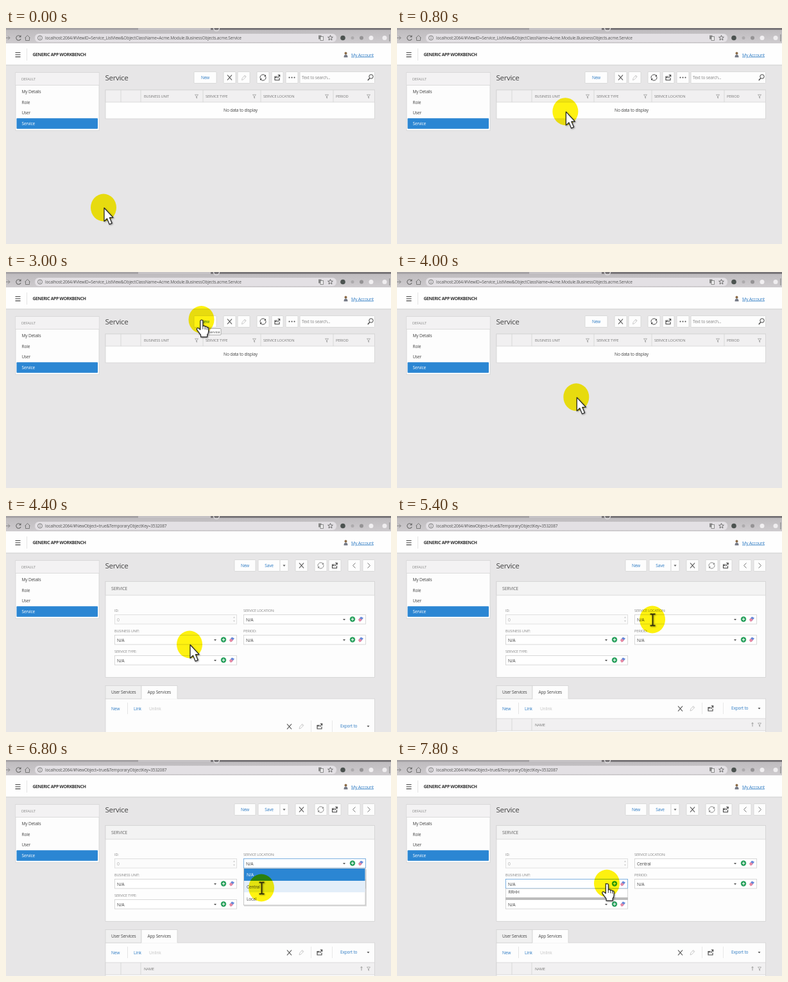
Write an HTML page that moves like this. It is 600x338 px and loops after 8 s.

```html
<!DOCTYPE html>
<html lang="en">
<head>
<meta charset="utf-8">
<title>Service form</title>
<style>
  html, body { margin: 0; width: 100%; height: 100%; overflow: hidden; background: #e7e6e7; }
  svg { display: block; width: 600px; height: 338px; }
  text { font-family: "Open Sans", "Noto Sans", sans-serif; letter-spacing: -.03em; }
  .brand { font-weight: 700; letter-spacing: -.05em; }
  #halo { mix-blend-mode: multiply; }
  #cursor { filter: drop-shadow(1.5px 1.5px 1px #0006); }
</style>
</head>
<body>
<svg id="stage" viewBox="0 0 600 338"></svg>
<script>
const BLUE = '#2b86d3', LINK = '#2f7cc4', INK = '#444', MUTED = '#858585', FAINT = '#c4c4c4', EDGE = '#d3d3d3';

// Drawing helpers, each returning SVG markup
const rect = (x, y, w, h, fill, stroke = 'none', extra = '') =>
  `<rect x="${x}" y="${y}" width="${w}" height="${h}" fill="${fill}" stroke="${stroke}" stroke-width=".8" ${extra}/>`;
const text = (x, y, s, size = 6.6, fill = INK, extra = '') =>
  `<text x="${x}" y="${y}" font-size="${size}" fill="${fill}" ${extra}>${s}</text>`;
const line = (d, color = INK, width = 1) =>
  `<path d="${d}" fill="none" stroke="${color}" stroke-width="${width}"/>`;
const shape = (d, fill) => `<path d="${d}" fill="${fill}"/>`;
const dot = (x, y, r, fill) => `<circle cx="${x}" cy="${y}" r="${r}" fill="${fill}"/>`;
const ring = (x, y, r, color, width = 1) =>
  `<circle cx="${x}" cy="${y}" r="${r}" fill="none" stroke="${color}" stroke-width="${width}"/>`;
const group = (id, ...parts) => `<g id="${id}">${parts.join('')}</g>`;
const center = 'text-anchor="middle"';

// Icons, placed by their middle
const cross = (x, y) => line(`M${x - 3.5} ${y - 4}l7 8m0-8l-7 8`, INK, 1.1);
const pencil = (x, y) => line(`M${x - 3} ${y + 4}l.7-3 4-4.5 2 2-4 4.5zm4-6.5l2 2`, FAINT, .9);
const popout = (x, y) =>
  line(`M${x} ${y - 1.5}h-4v5.5h7v-3.500m-7-.5h3`, INK, 1.1) + line(`M${x} ${y + 1}l3.500-5m-2.800 0h3v3`, INK, 1.1);
const refresh = (x, y, color = INK) =>
  line(`M${x - 4.500} ${y + 1}a4.600 4.800 0 0 1 8-4m1 2a4.600 4.800 0 0 1-8 4`, color, 1) +
  shape(`M${x + 4.500} ${y - 4.500}v3h-3zM${x - 4.500} ${y + 4.500}v-3h3z`, color);
const caret = (x, y) => shape(`M${x - 2} ${y - 1}h4l-2 2.500z`, '#555');
const funnel = (x, y) => line(`M${x - 2.500} ${y - 2.500}h5l-2 2.700v3l-1-.8v-2.200z`, '#999', .7);
const chevron = (x, y, dir) => line(`M${x - 2 * dir} ${y - 4}l${4 * dir} 4 ${-4 * dir} 4`, '#777', 1);
const plus = (x, y) => dot(x, y, 4.2, '#28a05c') + line(`M${x - 2.2} ${y}h4.400m-2.200-2.200v4.400`, '#fff', 1.1);
const eraser = (x, y) =>
  shape(`M${x - 4} ${y + 1}l4-5 4 2-4 5z`, '#6488d8') + shape(`M${x - 4} ${y + 1}l2-2.500 4 2-2 2.500-2 1z`, '#e88aa4');

const button = (x, w, content) => rect(x, 68.5, w, 18, '#fdfdfd', EDGE, 'rx="1"') + content;
const wordButton = (x, w, word) => button(x, w, text(x + w / 2, 80, word, 6.6, LINK, center));
const column = (x, name, filterX, y = 108.8) => text(x, y, name, 5.75, '#777') + funnel(filterX, y - 2);

function field(x, y, label, id = '') {
  return text(x, y - 4, label, 5.6, MUTED) + rect(x + .5, y + .5, 190, 14.5, '#fff', '#cfcfcf', id && `id="${id}Box"`) +
    text(x + 4, y + 10.5, 'N/A', 6.8, INK, id && `id="${id}Value"`) +
    caret(x + 157, y + 8) + plus(x + 170, y + 7.5) + eraser(x + 183, y + 7.5);
}

const browser = [
  '<linearGradient id="chrome" x2="0" y2="1"><stop stop-color="#bebbbe"/><stop offset="1" stop-color="#cfcccf"/></linearGradient>',
  rect(0, 2, 600, 22.5, 'url(#chrome)'),
  rect(0, 0, 206, 3, '#a5a2a5'), rect(206, 0, 113, 3, '#c6c3c6'), rect(319, 0, 281, 3, '#797679'),
  ring(328, 0, 4.5, '#dedcde', 1.5),
  rect(45, 9, 470, 13, '#e3e0e4', 'none', 'rx="6"'),
  line('M0 15.500h6m-3-3l3 3-3 3', '#888', 1),
  line('M22.500 13a3.800 3.800 0 1 0 .6 4', '#666', 1.1), shape('M23.500 11v3.500h-3.500z', '#666'),
  line('M34.500 15.500l4-4 4 4m-7-.5v4.500h6v-4.500', '#777', 1).replace('M34.500', 'M29.500'),
  ring(53, 15.5, 3.5, '#666', .8), line('M53 14.800v2.500m0-4v.8', '#666', .8),
  text(61, 18, '', 6.6, '#555', 'id="url"'),
  rect(487, 11.5, 4.5, 6, '#888'), rect(490, 13.5, 4.5, 6, '#eee', '#777'),
  line('M505.500 11.500l1.200 2.700h2.700l-2.200 1.900.8 2.900-2.500-1.700-2.500 1.700.8-2.900-2.200-1.900h2.700z', '#555', .8),
  dot(525, 15.5, 3.8, '#4c5350'), dot(540, 15.5, 2.5, '#adabad'), dot(554, 15.5, 3, '#959395'),
  dot(569, 15.5, 3.5, '#f2f0f2'), dot(590, 15.5, 3.5, '#efedef'), rect(597, 10, 1.5, 11, '#999')
].join('');

const header = [
  rect(0, 24, 600, 34, '#fefefe'), rect(0, 57.5, 600, 1, '#d0d0d0'),
  line('M14.500 38.500h8m-8 3.300h8m-8 3.300h8', '#444', 1.1), line('M32.500 32v19', '#ddd', .8),
  text(41.5, 44.2, 'GENERIC APP WORKBENCH', 6.8, '#333', 'class="brand"'),
  dot(529.5, 39.5, 2, '#8a6a45'), shape('M526.500 46q0-4.500 3-4.500t3 4.500z', '#777c88'),
  text(538, 44.5, 'My Account', 6.8, LINK, 'text-decoration="underline"')
].join('');

const sidebar = [
  rect(15, 69.5, 130, 91, '#fdfdfd', EDGE), rect(15.5, 70, 129, 19, '#f3f2f3'), line('M15 89.500h130', EDGE, .8),
  text(24, 81.7, 'DEFAULT', 5.5, MUTED),
  rect(16.5, 141.3, 126.5, 16.5, BLUE, 'none', 'rx="1"'),
  ...['My Details', 'Role', 'User', 'Service'].map((s, i) => text(24.5, 102.2 + 16.5 * i, s, 6.6, i < 3 ? INK : '#fff'))
].join('');

const list = group('list',
  wordButton(293, 35, 'New'), button(339, 19, cross(348.5, 77.5)), button(361, 19, pencil(370.5, 77.5)),
  button(391, 19, refresh(400.5, 77.5)), button(414, 18, popout(423, 77.5)),
  button(436, 19, [441.5, 445.5, 449.5].map(x => dot(x, 77.5, 1, INK)).join('')),
  button(458, 116.5, text(461, 80, 'Text to search...', 6.6, MUTED) +
    ring(569, 76, 3.2, INK) + line('M566.800 78.500l-3 3.500', INK, 1.3)),
  rect(155, 97, 419.5, 45, '#fefefe', EDGE), rect(155, 97, 419.5, 19, '#f1f0f1', EDGE),
  line('M179 97v19m31-19v19m97-19v19m90-19v19m113-19v19', EDGE, .8),
  column(215, 'BUSINESS UNIT', 297), column(311, 'SERVICE TYPE', 387),
  column(401, 'SERVICE LOCATION', 500), column(514, 'PERIOD', 565),
  text(365.5, 131.2, 'No data to display', 6.7, INK, center));

const detail = group('detail',
  wordButton(356, 33, 'New'), wordButton(393, 34, 'Save'), button(427, 13, caret(433.5, 77.5)),
  button(451, 19, cross(460.5, 77.5)), button(481, 19, refresh(490.5, 77.5, '#888')), button(503, 19, popout(512.5, 77.5)),
  button(533, 19, chevron(542.5, 77.5, -1)), button(556, 18.5, chevron(565.5, 77.5, 1)),
  rect(155, 102.5, 419.5, 150, '#fdfdfd', EDGE), rect(155, 102.5, 419.5, 21.5, '#f3f3f3', EDGE),
  text(164, 116, 'SERVICE', 7, '#666'),
  text(169, 150, 'ID:', 5.6, MUTED), rect(169.5, 154.5, 190, 14.5, '#fbfbfb', '#d9d9d9'),
  text(173, 164.5, '0', 6.8, '#aaa'), shape('M354 159.500h3l-1.500-2zm0 4h3l-1.500 2z', FAINT),
  field(169, 186, 'BUSINESS UNIT:', 'unit'), field(169, 218, 'SERVICE TYPE:'),
  field(370, 154, 'SERVICE LOCATION:', 'place'), field(370, 186, 'PERIOD:'),
  rect(155, 286, 419.5, 60, '#fdfdfd', EDGE), rect(155, 265.5, 56, 20.5, '#f0f0f0', EDGE),
  rect(211, 265.5, 56, 21, '#fdfdfd'), line('M211 286v-20.500h56v20.500', EDGE, .8),
  text(164, 278, 'User Services'), text(220.5, 278, 'App Services'),
  text(164, 303.5, 'New', 6.6, LINK), line('M189.500 292v18', '#ddd', .8),
  text(199, 303.5, 'Link', 6.6, LINK), text(223, 303.5, 'Unlink', 6.6, FAINT),
  group('tools', cross(441.5, 301.5), pencil(460, 301), popout(489, 301), line('M475.500 292v18m33-18v18', '#e2e2e2', .8),
    text(521, 303, 'Export to', 6.6, LINK), caret(564.5, 301)),
  group('names', rect(155, 317, 419.5, 19, '#f1f0f1', EDGE), line('M179 317v19m31-19v19', EDGE, .8),
    column(215, 'NAME', 565, 328.5), line('M554 329.500v-6m-1.500 1.700l1.500-1.700 1.500 1.700', '#888', .8)));

const overlays = [
  group('tip', rect(301, 88.5, 34, 10, '#fff', '#999', 'rx="1"'), text(303, 95.5, 'New Service', 5.7, '#555')),
  group('places', rect(371, 171, 191, 58, '#000', 'none', 'opacity=".13"'), rect(370.5, 169.5, 189.5, 57.5, '#fff', '#bbb'),
    rect(371, 170, 188.5, 19, BLUE), rect(371, 189, 188.5, 18, '#e3eef9', 'none', 'id="hover"'),
    text(375, 182.2, 'N/A', 6.6, '#fff'), text(375, 201, 'Central'), text(375, 219.5, 'Local')),
  group('units', rect(169.5, 201.5, 190, 14, '#fff', '#ccc'), text(173.5, 208.8, 'RRHH'), rect(169, 215, 191, 4, '#bdbdbd'))
].join('');

const outline = 'fill="#fff" stroke="#222" stroke-width="1.200" stroke-linejoin="round"';
const pointer = '<ellipse id="halo" rx="20" ry="21.500" fill="#fff310"/>' +
  group('cursor',
    `<path id="arrow" ${outline} d="M.5 0v21l4.500-4.300 3.700 9 4-1.800-3.800-8.700h5.600z"/>`,
    group('hand',
      `<path ${outline} d="M-2.200 2.200q0-2.200 2-2.200t2 2.200v7.500q2.300-1.200 3.400.7 2.200-.8 3 1 2.400-.4 2.400 2.200v4.400q0 3-2 5.200v3.500h-10v-3l-5.500-7.500q-1.700-2.800.2-3.500 1.500-.3 4.500 2.500z"/>`,
      line('M1.800 9.500v5m3.400-4v4.500m3-3.500v4', '#222', .9)),
    `<path id="beam" d="M-4-9h3l1 1 1-1h3M-4 9h3l1-1 1 1h3M0-8v16" fill="none" stroke="#33300a" stroke-width="1.900"/>`);

const stage = document.getElementById('stage');
stage.innerHTML = rect(0, 0, 600, 338, '#e7e6e7') + browser + header + sidebar +
  text(154.5, 82, 'Service', 11.6) + list + detail + overlays + pointer;

// Pointer path: time, x, y
const path = [
  [0, 152, 281], [1200, 301, 78], [1400, 299.5, 69.5], [1800, 299.5, 69.5], [2800, 304.5, 74.5], [3000, 304.5, 74.5],
  [3800, 277, 194], [4400, 286, 201], [4600, 286, 201], [5200, 369, 181], [5400, 398, 162], [6000, 398, 162],
  [6800, 398, 200], [7000, 398, 200], [7600, 327, 193], [8000, 327, 193]
];

function pointerAt(t) {
  const i = path.findIndex(key => key[0] > t);
  const [t0, x0, y0] = path[i - 1], [t1, x1, y1] = path[i];
  const p = (t - t0) / (t1 - t0), e = p * p * (3 - 2 * p);
  return [x0 + (x1 - x0) * e, y0 + (y1 - y0) * e];
}

const el = id => document.getElementById(id);
const show = (id, on) => el(id).setAttribute('display', on ? 'inline' : 'none');
const between = (t, a, b) => t >= a && t < b;
const STEP = 200, LOOP = 8000;

function render(t) {
  const editing = t >= 4200, settled = t >= 4600;
  const choosing = between(t, 6000, 7200), unitOpen = t >= 7800;
  show('list', !editing);
  show('detail', editing);
  show('names', settled);
  el('tools').setAttribute('transform', `translate(0 ${settled ? 0 : 28})`);
  el('url').textContent = 'localhost:2064/#' + (editing
    ? 'NewObject=true&TemporaryObjectKey=3532087'
    : 'ViewID=Service_ListView&ObjectClassName=Acme.Module.BusinessObjects.acme.Service');
  show('tip', between(t, 2400, 3200));
  show('places', choosing);
  show('hover', t >= 6600);
  show('units', unitOpen);
  el('placeValue').textContent = t >= 7200 ? 'Central' : 'N/A';
  el('placeBox').setAttribute('stroke', choosing ? '#5f9fda' : '#cfcfcf');
  el('unitBox').setAttribute('stroke', unitOpen ? '#5f9fda' : '#cfcfcf');

  const [x, y] = pointerAt(t);
  const hand = between(t, 1200, 3200) || t >= 7600, beam = between(t, 5400, 7200);
  el('halo').setAttribute('transform', `translate(${x} ${y})`);
  el('cursor').setAttribute('transform', `translate(${x + .5} ${y + .5})`);
  show('hand', hand);
  show('beam', beam);
  show('arrow', !hand && !beam);
}

const start = performance.now();
function tick() {
  const t = (performance.now() - start) % LOOP;
  render(Math.floor(t / STEP) * STEP);
  requestAnimationFrame(tick);
}
tick();
</script>
</body>
</html>
```
